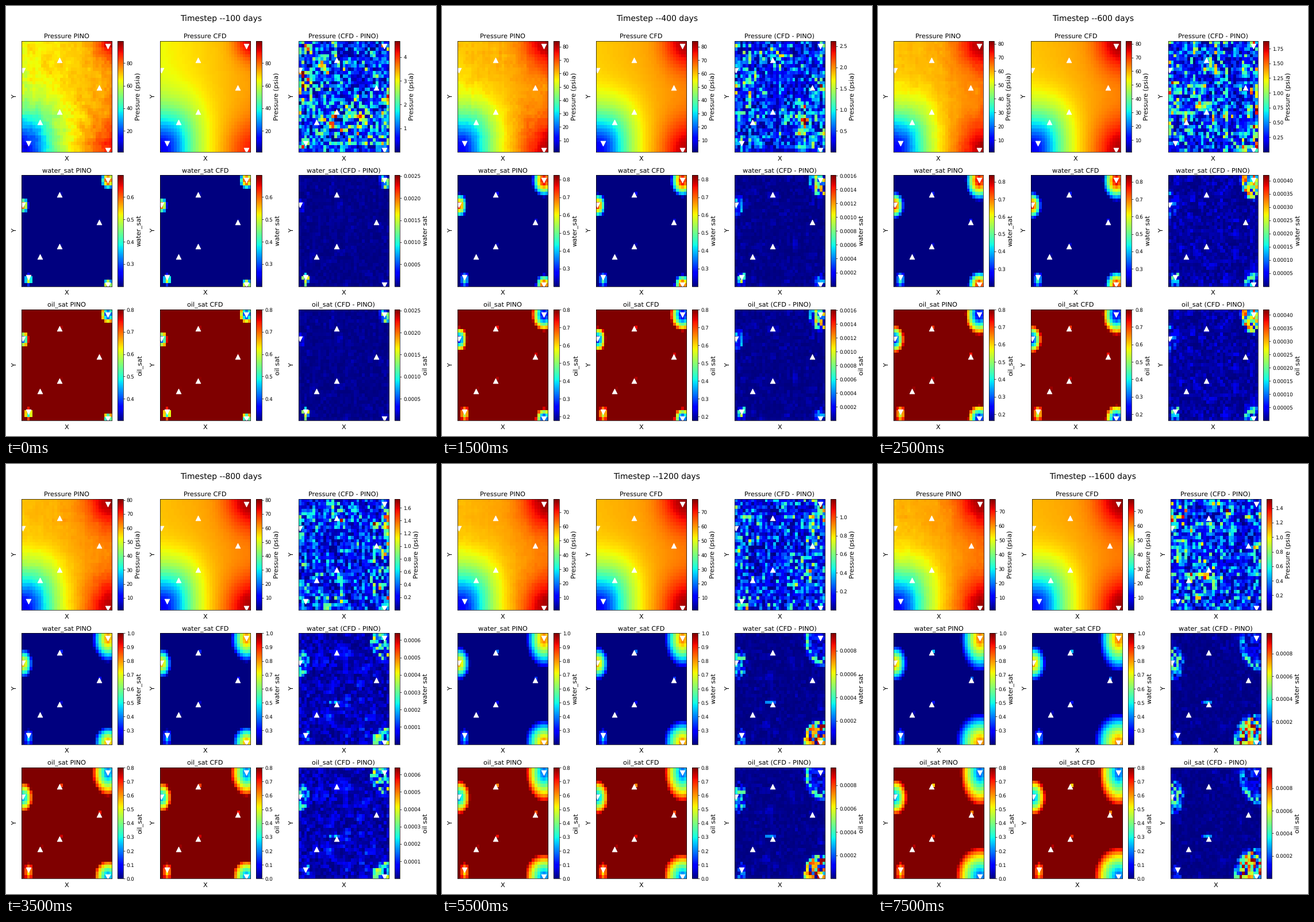
A matplotlib script for the animation above (8000 ms loop, 748 by 748 pixels).

```python
import numpy as np
import matplotlib.pyplot as plt
from matplotlib.animation import FuncAnimation

plt.rcParams["text.hinting"] = "none"

SIZE = 748
N = 33
STEPS = 16
LOW, HIGH = 0.5, 32.5
PRODUCERS = [(14, 27), (28, 19), (14, 12), (7, 9)]
INJECTORS = [(1, 24), (3, 3), (31, 1), (31, 31)]

# Peak errors at a few steps
KEYS = [1, 3, 5, 6, 8, 12, 14, 16]
PRESSURE_GAP = [4.68, 3.29, 1.96, 1.88, 1.74, 1.196, 1.063, 1.526]
WATER_GAP = [.00252, .00233, .000885, .00042, .00064, .00095, .00094, .00098]

unit = (np.arange(N) + 0.5) / N
U, V = np.meshgrid(unit, unit)
GX, GY = LOW + 32 * U, LOW + 32 * V


def bell(x, centre, width):
    return np.exp(-((x - centre) / width) ** 2)


def smooth(z):
    """Blend each cell with its neighbours, keeping the spread."""
    return (1.4 * z + sum(np.roll(z, d, a) for d in (1, -1) for a in (0, 1))) / 2.44


def pressure(n):
    """Simulated pressure as a fraction of its colour range."""
    k = np.sqrt(np.log(n) / np.log(STEPS))
    base = 0.64 + 0.075 * k + (0.10 - 0.05 * k) * U
    r = np.cbrt(U ** 3 + V ** 3)
    dip = (0.55 + 0.07 * k) * np.exp(-(r / 0.355) ** 1.9)
    wide = 0.17 + 0.11 * k
    top = (0.20 + 0.02 * k) * bell(U, 1, wide) * bell(V, 1, wide)
    low = (0.14 + 0.08 * k) * bell(U, 1, 0.26) * bell(V, 0, 0.28)
    return np.clip(base - dip + top + low, 0, 1)


def pressure_error(n):
    """Signed streaky error with a few stronger patches, peak near one."""
    rng = np.random.default_rng(40 + n)
    z = smooth(rng.normal(size=(N, N))) + 0.4 * rng.normal(size=(N, N))
    z += 0.45 * rng.normal(size=N) + 0.3 * rng.normal(size=(N, 1))
    gain = 0.42 + 0.2 * bell(U, 0, 0.12) + 0.2 * bell(U, 1, 0.12)
    for x, y in rng.uniform(0, 1, (4, 2)):
        gain = gain + 0.3 * bell(U, x, 0.15) * bell(V, y, 0.15)
    error = 0.45 * z * gain
    return error / np.abs(error).max()


def plumes(n):
    """Injected water: name, radius field, rise at the core, error level."""
    spots = [
        ("top", 31, 31, 2.4 * n ** 0.35, 2.3 * n ** 0.49, 0.64 - 0.12 / n,
         0.55 + 0.4 * bell(n, 6, 2.5)),
        ("left", 1, 23.8, 1.9 * n ** 0.26, 2.1 * n ** 0.3, 0.61 - 0.16 / n,
         0.55 * (1 - np.exp(-n / 4))),
        ("bottom", 31, 1, 1.1 + 0.42 * n, 1.1 + 0.42 * n, 0.63 - 0.12 / n,
         min(1, n / 12)),
        ("corner", 3, 2.4, 1.5, 1.5 * n ** 0.22, 0.28 + 0.09 / n,
         0.95 * np.exp(-n / 10)),
    ]
    for name, x, y, rx, ry, core, level in spots:
        yield name, np.hypot((GX - x) / rx, (GY - y) / ry), core, level


def water(n):
    sat = np.full((N, N), 0.2)
    for _, r, core, _ in plumes(n):
        sat = np.maximum(sat, 0.2 + core * np.clip(1.08 - r, 0, 1) ** 0.75)
    for i, (x, y) in enumerate(PRODUCERS):
        sat[y, x] = 0.2 + (0.25 - 0.07 * i) * n / STEPS
    return sat


def water_error(n):
    rng = np.random.default_rng(90 + n)
    err = (0.02 + 0.05 * bell(n, 7.5, 1.8)) * np.abs(smooth(rng.normal(size=(N, N))))
    late = np.clip((n - 5) / 7, 0, 1)
    for name, r, _, level in plumes(n):
        mask = np.clip((1.12 - r) * 4, 0, 1)
        if name == "top":
            mask = mask * (1 - 0.65 * late) + 0.65 * late * bell(r, 0.88, 0.13)
        err = np.maximum(err, level * mask * rng.uniform(0, 1, (N, N)))
    streak = 0.35 * np.clip((n - 6) / 2, 0, 1)
    err[12, 11:15] = np.maximum(err[12, 11:15], streak * rng.uniform(0.3, 1, 4))
    return np.clip(err, 0, 1)


def panel_data(n, sat_gap):
    """Image, low and high limit for the nine panels, row by row."""
    low, high = 1.4, 75.1 + 24.5 * n ** -0.7
    gap = np.interp(n, KEYS, PRESSURE_GAP)
    cfd = low + (high - low) * pressure(n)
    error = gap * pressure_error(n)
    wet, peak = water(n), 0.865 - 0.167 / n if n < 7 else 1.0
    wet_panel = (wet, 0.2002, peak)
    oil_panel = (1 - wet, 1 - peak, 0.8)
    gap_panel = (sat_gap * water_error(n), 1e-4 * sat_gap, sat_gap)
    return [
        (cfd - error, low, high), (cfd, low, high), (np.abs(error), 1e-4, gap),
        wet_panel, wet_panel, gap_panel,
        oil_panel, oil_panel, gap_panel,
    ]


def box(x, y, w, h):
    return [x / SIZE, 1 - (y + h) / SIZE, w / SIZE, h / SIZE]


def place(shrink):
    """Lay out the grid; long tick labels make every column narrower."""
    full = 196.6 - shrink
    for i, (ax, cax) in enumerate(zip(axes, bars)):
        x = 27 + (i % 3) * (full + 44.15)
        y = 60.6 + (i // 3) * 233.75
        ax.set_position(box(x, y, 0.8 * full, 193.2))
        cax.set_position(box(x + 0.85 * full, y, 9.66, 193.2))


fig = plt.figure(figsize=(12, 12), dpi=SIZE / 12, facecolor="white")
title = fig.suptitle("", fontsize=16)
axes, bars, images = [], [], []

for name in ("Pressure", "water_sat", "oil_sat"):
    for kind in ("PINO", "CFD", "(CFD - PINO)"):
        ax = fig.add_axes([0, 0, 0.1, 0.1], label=f"{name} {kind}")
        cax = fig.add_axes([0, 0, 0.1, 0.1], label=f"{name} {kind} bar")
        image = ax.imshow(np.zeros((N, N)), cmap="jet", origin="lower", aspect="auto",
                          interpolation="nearest", vmin=0, vmax=1,
                          extent=(LOW, HIGH, LOW, HIGH))
        for wells, marker in ((PRODUCERS, "^"), (INJECTORS, "v")):
            ax.scatter(*zip(*wells), s=100, c="white", marker=marker)
        ax.set(xlim=(LOW, HIGH), ylim=(LOW, HIGH), xticks=[], yticks=[])
        ax.set_title(f"{name} {kind}", fontsize=13)
        ax.set_xlabel("X", fontsize=13, labelpad=7.5)
        ax.set_ylabel("Y", fontsize=13, labelpad=7.5)
        label = "Pressure (psia)" if name == "Pressure" else name
        if kind != "PINO":
            label = label.replace("_", " ")
        fig.colorbar(image, cax=cax).set_label(label, fontsize=13)
        axes.append(ax)
        bars.append(cax)
        images.append(image)


def update(i):
    n = i + 1
    sat_gap = np.interp(n, KEYS, WATER_GAP)
    title.set_text(f"Timestep --{100 * n} days")
    place(1.84 if sat_gap < 0.00045 else 0)
    for image, (data, low, high) in zip(images, panel_data(n, sat_gap)):
        image.set_data(data)
        image.set_clim(low, high)
    return images


anim = FuncAnimation(fig, update, frames=STEPS, interval=500, repeat=True,
                     repeat_delay=0, blit=False)
plt.show()
```
